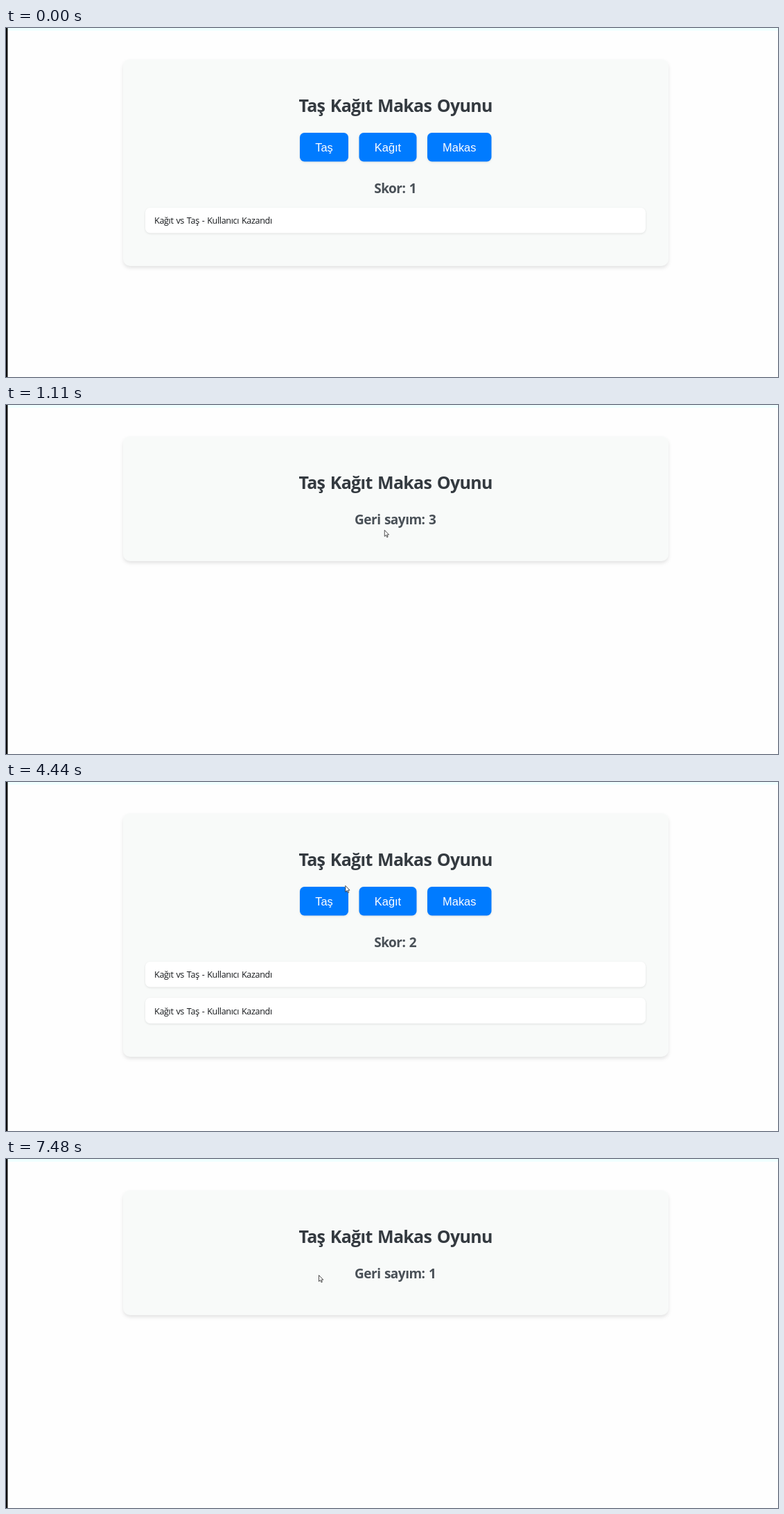
Write an HTML page that moves like this. It is 1114x503 px and loops after 8 s.

```html
<!DOCTYPE html>
<html lang="tr">
<head>
<meta charset="utf-8">
<title>Taş Kağıt Makas Oyunu</title>
<style>
html, body { margin: 0; width: 100%; height: 100%; overflow: hidden; background: #fefefe; }
svg { display: block; }
text { font-family: "Open Sans", "Noto Sans", sans-serif; }
.title, .sub { font-weight: 700; text-anchor: middle; }
.title { font-size: 25px; letter-spacing: -.72px; word-spacing: 1.8px; fill: #343a40; }
.sub { font-size: 19px; letter-spacing: -.5px; word-spacing: 1px; fill: #495057; }
.row text { font-size: 12.6px; letter-spacing: -.34px; word-spacing: .9px; fill: #15181b; }
.row rect { fill: #fff; filter: drop-shadow(0 1.6px 1.6px rgba(0,0,0,.1)); }
.card { fill: #f8faf9; filter: drop-shadow(0 3px 2.5px rgba(0,0,0,.1)); }
.button rect { filter: drop-shadow(0 1.6px 1.6px rgba(0,0,0,.1)); }
.button text { font: 16.4px "Liberation Sans", Arial, sans-serif; text-anchor: middle; fill: #fff; }
.cursor { fill: #fff; stroke: #222; stroke-width: .8; stroke-linejoin: round; }
</style>
</head>
<body>
<svg width="1114" height="503" viewBox="0 0 1114 503">
  <rect width="1114" height="4" fill="#f0ffff"/>
  <rect width="2.4" height="503" fill="#000"/>
  <rect id="card" class="card" x="169" y="45" width="787" height="298" rx="10"/>
  <text class="title" x="562" y="120.5">Taş Kağıt Makas Oyunu</text>
  <text id="count" class="sub" x="561.7" y="172"></text>
  <g id="game">
    <g id="buttons"></g>
    <text id="score" class="sub" x="561.7" y="237.5"></text>
    <g class="row">
      <rect x="201" y="259" width="722" height="36.5" rx="7"/>
      <text x="214" y="282">Kağıt vs Taş - Kullanıcı Kazandı</text>
    </g>
    <g id="second" class="row">
      <rect x="201" y="311" width="722" height="37" rx="7"/>
      <text x="214" y="335">Kağıt vs Taş - Kullanıcı Kazandı</text>
    </g>
  </g>
  <g id="cursor" class="cursor">
    <path id="arrow" d="M.5 .5V9.5L2.6 7.6L4 10.8L5.4 10.2L4 7.1H6.8Z"/>
    <path id="hand" d="M-1 1Q0 -.5 1 1V4.5Q2 3.8 2.8 5Q3.8 4.3 4.5 5.4Q6 5 6 6.6V9L5 12.3H-.7L-4 8Q-4 6.3 -2.5 7L-1 8.2Z"/>
  </g>
</svg>
<script>
const $ = id => document.getElementById(id);
const LOOP = 8000, LIFT = 2, EASE_MS = 200;
const PICK_1 = 1105, RESULT = 4100, PICK_2 = 5460;

const buttons = [
  { label: 'Taş', x: 424, w: 70, hovers: [[490, 690]] },
  { label: 'Kağıt', x: 509.5, w: 83, hovers: [[690, PICK_1], [4500, 4790]] },
  { label: 'Makas', x: 608, w: 92.5, hovers: [[4800, PICK_2]] }
];

// Pointer tip: time, x, y
const path = [
  [70, 977, 491], [480, 478, 194], [600, 474, 181], [690, 513, 180], [760, 544, 180],
  [830, 546, 180], [1110, 546, 180], [1440, 464, 138], [3700, 464, 138], [3770, 462, 138],
  [4370, 462, 138], [4500, 512, 158], [4640, 560, 176], [4800, 613, 178], [4860, 654, 178],
  [5070, 655, 178], [5330, 655, 178], [5400, 671, 177], [5600, 671, 177], [5810, 451, 167]
];

for (const b of buttons) {
  const mid = b.x + b.w / 2;
  $('buttons').insertAdjacentHTML('beforeend', `<g class="button">
    <rect x="${b.x}" y="151" width="${b.w}" height="41.5" rx="6.5"/>
    <text x="${mid}" y="177.5">${b.label}</text></g>`);
  b.el = $('buttons').lastElementChild;
}

const clamp = v => Math.max(0, Math.min(1, v));
const show = (id, on) => $(id).setAttribute('display', on ? 'inline' : 'none');

function pointerAt(t) {
  const i = path.findIndex(p => p[0] > t);
  if (i < 0) return path[path.length - 1].slice(1);
  if (i === 0) return path[0].slice(1);
  const [t0, x0, y0] = path[i - 1], [t1, x1, y1] = path[i];
  const k = (t - t0) / (t1 - t0);
  return [x0 + (x1 - x0) * k, y0 + (y1 - y0) * k];
}

function countAt(t) {
  if (t >= PICK_2) return t < 6490 ? 3 : t < 7480 ? 2 : 1;
  if (t >= PICK_1 && t < RESULT) return t < 2120 ? 3 : t < 3110 ? 2 : 1;
  return 0;
}

function draw(t) {
  const count = countAt(t), won = t >= RESULT;
  show('count', count);
  show('game', !count);
  show('second', won);
  $('count').textContent = `Geri sayım: ${count}`;
  $('score').textContent = `Skor: ${won ? 2 : 1}`;
  $('card').setAttribute('height', count ? 180 : won ? 351 : 298);

  let hovering = false;
  for (const b of buttons) {
    const over = b.hovers.some(([from, to]) => t >= from && t < to);
    const lift = b.hovers.reduce((sum, [from, to]) =>
      sum + clamp((t - from) / EASE_MS) - clamp((t - to) / EASE_MS), 0);
    b.el.setAttribute('transform', `translate(0 ${-LIFT * lift})`);
    b.el.firstElementChild.setAttribute('fill', over ? '#0056b3' : '#007bff');
    hovering = hovering || over;
  }

  show('cursor', t >= 70);
  show('hand', hovering);
  show('arrow', !hovering);
  $('cursor').setAttribute('transform', `translate(${pointerAt(t).join(' ')})`);
}

const start = performance.now();
function tick() {
  draw((performance.now() - start) % LOOP);
  requestAnimationFrame(tick);
}
tick();
</script>
</body>
</html>
```
